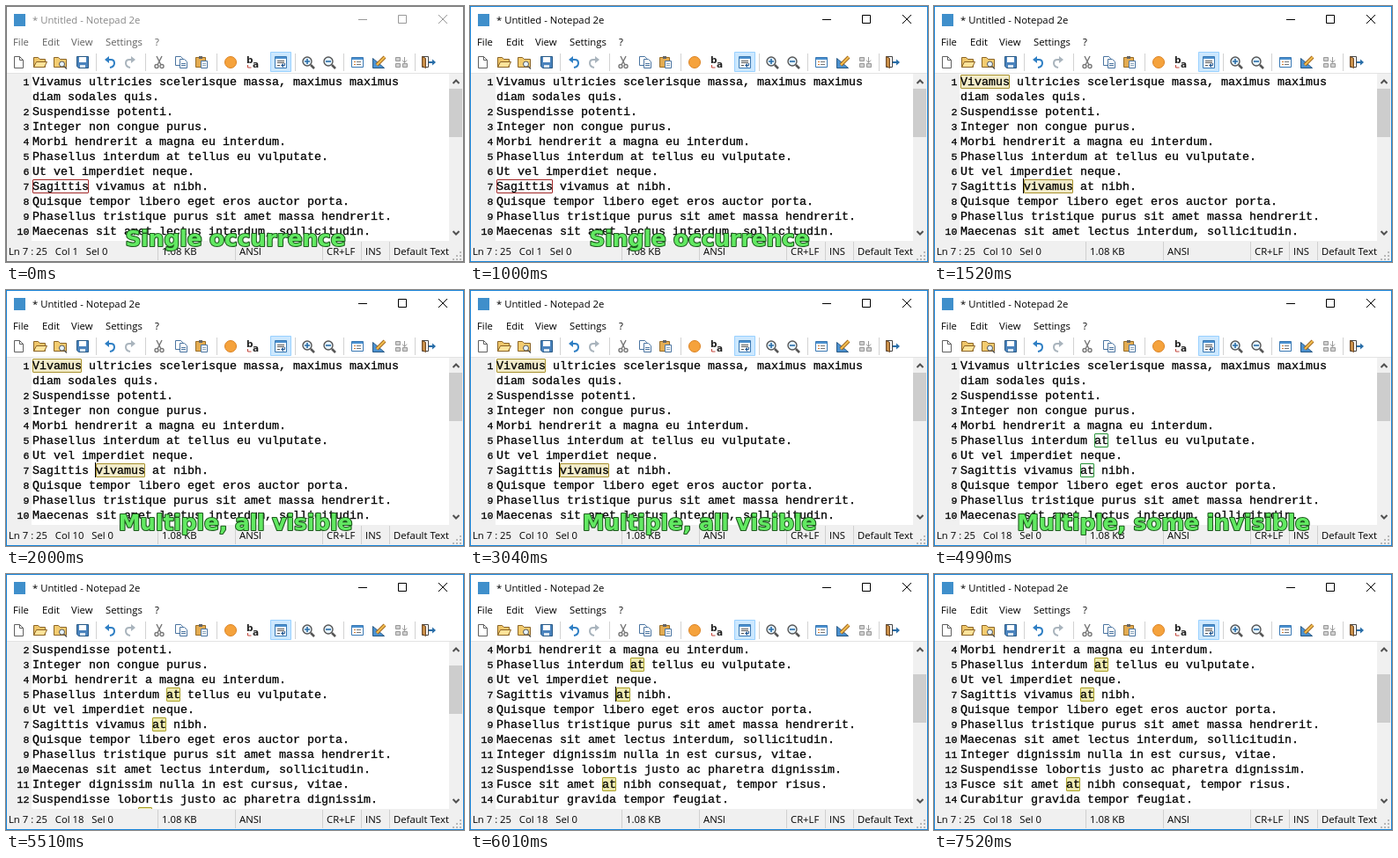
Animation, 520 px wide and 291 px high, one loop 8 s. Source, as an HTML page:

```html
<!DOCTYPE html>
<html lang="en">
<head>
<meta charset="utf-8">
<title>Text editor</title>
<style>
html, body { margin: 0; width: 100%; height: 100%; overflow: hidden; background: #fff; }
svg { display: block; width: 520px; height: 291px; }
text { white-space: pre; }
.ui { font: 11.3px "Open Sans", "Noto Sans", sans-serif; }
.code { font: 13.33px "Liberation Mono", monospace; stroke: #000; stroke-width: .3px; }
.num { font: 11.6px "Liberation Mono", monospace; text-anchor: end; stroke: #000; stroke-width: .3px; }
.caption { font: bold 24.8px "DejaVu Sans", sans-serif; text-anchor: middle; fill: #62e962;
  stroke: #1d5a1d; stroke-width: 2.2px; stroke-linejoin: round; paint-order: stroke; }
</style>
</head>
<body>
<svg viewBox="0 0 520 291" xmlns="http://www.w3.org/2000/svg">
  <defs><clipPath id="view"><rect x="1" y="77" width="502" height="190"/></clipPath></defs>
  <rect width="520" height="291" fill="#fff"/>

  <rect x="9" y="9" width="13" height="14" fill="#3f8fcb"/>
  <g id="titleBar">
    <text class="ui" x="30" y="20">* Untitled - Notepad 2e</text>
    <path d="M400 15.5h10M445.500 10.500h9v9h-9zM491 10l10 10M501 10l-10 10" fill="none" stroke="currentColor"/>
  </g>
  <g id="menu" class="ui"></g>

  <g id="toolbar" fill="none">
    <path id="separators" stroke="#d2d2d2"/>
    <g transform="translate(14 64)"><path d="M-4.500 -6.500h6l4 4v9h-10z" fill="#fff" stroke="#606060"/><path d="M1.500 -6.500v4h4" stroke="#606060"/></g>
    <g transform="translate(39 64)"><path d="M-7.500 5.500v-11h5l2 2h6v9z" fill="#efc66a" stroke="#8a6426"/><path d="M-7.500 5.500l3-6h12l-3 6z" fill="#ffe39a" stroke="#8a6426"/></g>
    <g transform="translate(61 64)"><path d="M-6.500 5.500v-11h5l2 2h7v9z" fill="#f3cc70" stroke="#8a6426"/><circle cx="2.500" cy="2" r="3" fill="#e6f3fc" stroke="#555"/><path d="M5 4.500l3 3" stroke="#555" stroke-width="1.500"/></g>
    <g transform="translate(87 64)"><path d="M-6.500 -6.500h13v13h-11l-2-2z" fill="#4a83bd" stroke="#285985"/><path d="M-4 -6h8v6h-8z" fill="#fff"/><path d="M-3 3h6v3h-6z" fill="#dce8f2"/></g>
    <g transform="translate(118 64)"><path d="M-3 -3h4q4 0 4 4t-5 5" stroke="#2f7fc4" stroke-width="2"/><path d="M-6 -3l5-4v8z" fill="#2f7fc4"/></g>
    <g transform="translate(141 64) scale(-1 1)"><path d="M-3 -3h4q4 0 4 4t-5 5" stroke="#a9b4bd" stroke-width="2"/><path d="M-6 -3l5-4v8z" fill="#a9b4bd"/></g>
    <g transform="translate(174 64)" stroke="#777" stroke-width="1.400"><path d="M-3 -7l5 10M3 -7l-5 10"/><circle cx="-3" cy="4.500" r="2"/><circle cx="3" cy="4.500" r="2"/></g>
    <g transform="translate(199 64)" fill="#fff" stroke="#4a74a0"><path d="M-6.500 -6.500h6l2 2v8h-8z"/><path d="M-1.500 -3.500h5l3 3v7h-8z"/><path d="M0 1.500h5M0 3.500h5"/></g>
    <g transform="translate(222 64)"><path d="M-6.500 -5.500h11v11h-11z" fill="#e3ac52" stroke="#986c25"/><path d="M-3 -7h4v3h-4z" fill="#666"/><path d="M-.5 -1.500h7v8h-7z" fill="#fff" stroke="#4a74a0"/><path d="M1 1.500h4M1 3.500h4" stroke="#8ba6bd"/></g>
    <circle cx="255" cy="64" r="6.500" fill="#f5a23c" stroke="#dc8425"/>
    <g font-family="DejaVu Sans, sans-serif" font-weight="bold" font-size="10.500"><text x="273" y="65" fill="#222">b</text><text x="280" y="70" fill="#222">a</text><path d="M274.500 67v3h4" stroke="#c1453a"/></g>
    <path d="M300.500 52.500h23v22h-23z" fill="#cce8ff" stroke="#99d1ff"/>
    <g transform="translate(312 64)"><path d="M-6.500 -6.500h13v13h-13z" fill="#fff" stroke="#3978b3"/><path d="M-6 -6h12v2h-12z" fill="#4b91d0"/><path d="M-4 -1.500h8M-4 .5h8M-4 3.500h3" stroke="#555"/><path d="M4.500 1v2.500h-3" stroke="#275b93"/><path d="M0 3.500l3-2.500v5z" fill="#275b93"/></g>
    <g id="lenses"></g>
    <g transform="translate(399 64)"><path d="M-6.500 -5.500h13v11h-13z" fill="#fff" stroke="#3978b3"/><path d="M-6 -5h12v2h-12z" fill="#4b91d0"/><path d="M-4 -.5h2M-4 2.500h2" stroke="#d27b32"/><path d="M-1 -.5h5M-1 2.500h5" stroke="#777"/></g>
    <g transform="translate(424 64)"><path d="M-7.500 -4.500v11h13z" fill="#4b91d0" stroke="#285985"/><path d="M-3 3l9-9" stroke="#a36a24" stroke-width="4"/><path d="M-3 3l9-9" stroke="#f2bd4e" stroke-width="2"/></g>
    <g transform="translate(449 64)" fill="#d0d0d0" stroke="#999"><path d="M-6.500 -5.500h5v4h-5zM-6.500 1.500h5v4h-5zM1.500 1.500h5v4h-5z"/><path d="M3.500 -6v6M1 -2.500l2.500 3 2.500-3" fill="none"/></g>
    <g transform="translate(479 64)"><path d="M-6.500 -6.500h7v12h-7z" fill="#fff" stroke="#444"/><path d="M-6.500 -6.500l4 2v11l-4-2z" fill="#c98f48" stroke="#6c4826"/><path d="M1 0h5" stroke="#286da8" stroke-width="2"/><path d="M5 -3.500l4 3.500-4 3.500z" fill="#286da8"/></g>
  </g>

  <rect x="1" y="76" width="518" height="1" fill="#e3e3e3"/>
  <rect x="1" y="77" width="28" height="190" fill="#f0f0f0"/>
  <g clip-path="url(#view)">
    <g id="page"><g id="marks"></g><g id="lines"></g><rect id="caret" width="1" height="17"/></g>
  </g>
  <rect x="503" y="77" width="16" height="190" fill="#f0f0f0"/>
  <rect id="thumb" x="503" width="15" height="55" fill="#cdcdcd"/>
  <path d="M507.500 88l3.500-3.500 3.500 3.500M507.500 256l3.500 3.500 3.500-3.500" fill="none" stroke="#505050" stroke-width="2"/>

  <rect x="1" y="267" width="518" height="23" fill="#f0f0f0"/>
  <path d="M172.500 268v21M260.500 268v21M359.500 268v21M403.500 268v21M435.500 268v21" stroke="#d0d0d0"/>
  <g id="status" class="ui"></g>
  <path d="M515 280h2m-2 4h2m-2 4h2m-6-4h2m-2 4h2m-6 0h2" stroke="#b8b8b8" stroke-width="2"/>
  <rect id="frame" x=".5" y=".5" width="519" height="290" fill="none"/>
  <text id="caption" class="caption" x="260.500" y="273"></text>
</svg>
<script>
const LOOP = 8000, ROW = 17, TOP = 77, LEFT = 30, CHAR = 8;
const $ = id => document.getElementById(id);
const label = (x, y, text, cls = '') => `<text class="${cls}" x="${x}" y="${y}">${text}</text>`;

const rows = [
  'Vivamus ultricies scelerisque massa, maximus maximus', 'diam sodales quis.',
  'Suspendisse potenti.', 'Integer non congue purus.', 'Morbi hendrerit a magna eu interdum.',
  'Phasellus interdum at tellus eu vulputate.', 'Ut vel imperdiet neque.',
  'Sagittis vivamus at nibh.', 'Quisque tempor libero eget eros auctor porta.',
  'Phasellus tristique purus sit amet massa hendrerit.',
  'Maecenas sit amet lectus interdum, sollicitudin.',
  'Integer dignissim nulla in est cursus, vitae.',
  'Suspendisse lobortis justo ac pharetra dignissim.',
  'Fusce sit amet at nibh consequat, tempor risus.', 'Curabitur gravida tempor feugiat.'
];

// The first line wraps, so row 1 carries no number.
$('lines').innerHTML = rows.map((text, i) => {
  const y = TOP + i * ROW + 13;
  const number = i === 1 ? '' : label(26.5, y, i || 1, 'num');
  return number + label(LEFT, y, text, 'code');
}).join('');

$('menu').innerHTML = [[8, 'File'], [41, 'Edit'], [74, 'View'], [113, 'Settings'], [169, '?']]
  .map(([x, text]) => label(x, 45, text)).join('');
$('status').innerHTML = '<text id="position" x="3" y="283"></text>' +
  [[177, '1.08 KB'], [265, 'ANSI'], [364, 'CR+LF'], [408, 'INS'], [440, 'Default Text']]
    .map(([x, text]) => label(x, 283, text)).join('');
$('separators').setAttribute('d', [102, 158, 239, 328, 383, 464].map(x => `M${x}.5 54v20`).join(''));
$('lenses').innerHTML = [[343, 'M-4 -1h6M-1 -4v6'], [367, 'M-4 -1h6']].map(([x, sign]) =>
  `<g transform="translate(${x} 64)"><path d="M3 3l4 4" stroke="#555" stroke-width="2.500"/>
   <circle cx="-1" cy="-1" r="5" fill="#e6f3fc" stroke="#555" stroke-width="1.400"/>
   <path d="${sign}" stroke="#286da8" stroke-width="1.600"/></g>`).join('');

const styles = {
  single: ['#fff', '#a12626'],
  visible: ['#f2ecca', '#a8912c'],
  partial: ['#fff', '#259335'],
  all: ['#eeeab0', '#aaa025']
};

// Each occurrence is [row, column, length].
const words = {
  sagittis: [[7, 0, 8]],
  vivamus: [[0, 0, 7], [7, 9, 7]],
  at: [[5, 19, 2], [7, 17, 2], [13, 15, 2]]
};

const scenes = [
  { from: 0, word: 'sagittis', style: 'single', col: 1 },
  { from: 1520, word: 'vivamus', style: 'visible', col: 10 },
  { from: 3510, word: 'at', style: 'partial', col: 18 },
  { from: 5510, word: 'at', style: 'all', col: 18 }
];
const captions = [
  [0, 1520, 'Single occurrence'],
  [2000, 3510, 'Multiple, all visible'],
  [3990, 5510, 'Multiple, some invisible']
];
const caretOn = [[500, 1000], [1520, 2530], [3040, 3990], [4510, 4990], [6010, 6510], [7010, 7520]];
const within = t => ([from, to]) => t >= from && t < to;

let shown;
function showScene(scene) {
  if (scene === shown) return;
  shown = scene;
  const [fill, stroke] = styles[scene.style];
  $('marks').innerHTML = words[scene.word].map(([row, col, length]) =>
    `<rect x="${LEFT + col * CHAR + .5}" y="${TOP + row * ROW + 1.5}" width="${length * CHAR - 1}"
      height="15" rx=".5" fill="${fill}" stroke="${stroke}"/>`).join('');
  $('position').textContent = `Ln 7 : 25   Col ${scene.col}   Sel 0`;
  $('caret').setAttribute('x', LEFT + (scene.col - 1) * CHAR - (scene.col > 1 ? 1 : 0));
  $('caret').setAttribute('y', TOP + 7 * ROW);
}

function render(t) {
  const active = t >= 500;
  const scroll = t < 5510 ? 0 : t < 6010 ? 2 : 4;
  showScene(scenes.findLast(scene => t >= scene.from));

  $('titleBar').setAttribute('color', active ? '#000' : '#999');
  $('titleBar').setAttribute('fill', active ? '#000' : '#888');
  $('menu').setAttribute('fill', active ? '#000' : '#606060');
  $('frame').setAttribute('stroke', active ? '#1883d7' : '#777');
  $('page').setAttribute('transform', `translate(0 ${-scroll * ROW})`);
  $('thumb').setAttribute('y', 94 + scroll * 5);
  $('caret').setAttribute('visibility', caretOn.some(within(t)) ? 'visible' : 'hidden');
  const caption = captions.find(within(t));
  $('caption').textContent = caption ? caption[2] : '';
}

function tick() {
  render(performance.now() % LOOP);
  requestAnimationFrame(tick);
}
tick();
</script>
</body>
</html>
```
